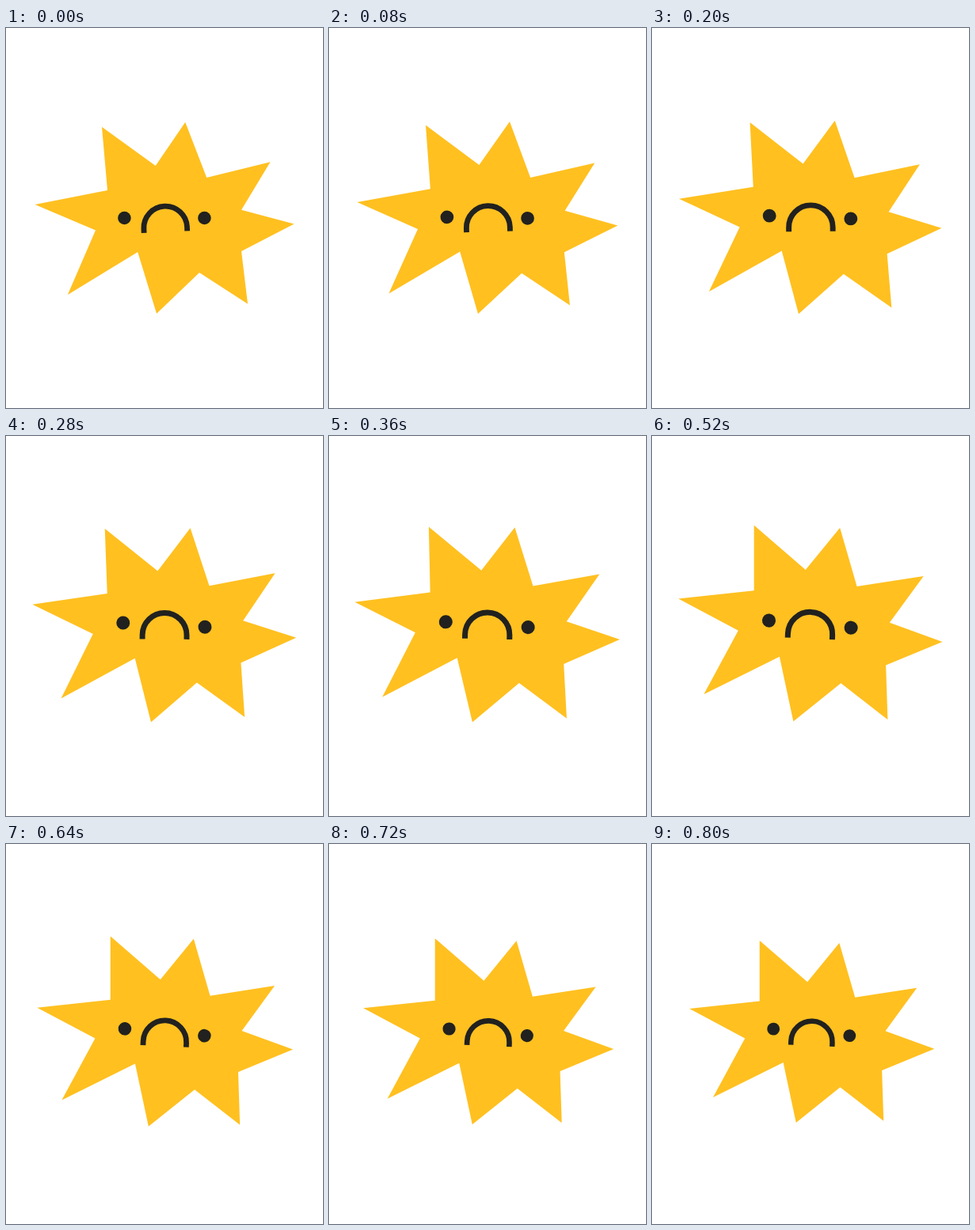
Write an HTML page with a canvas that moves like this. It is 400 px wide and 480 px high and loops after 960 ms.

```html
<!DOCTYPE html>
<html lang="en">
<head>
<meta charset="utf-8">
<title>Grumpy star</title>
<style>
  html, body { margin: 0; width: 100%; height: 100%; overflow: hidden; background: #fff; }
  canvas { display: block; width: 400px; height: 480px; }
</style>
</head>
<body>
<canvas id="stage" width="400" height="480"></canvas>
<script>
const ctx = document.getElementById("stage").getContext("2d");

const LOOP = 960, STEP = 40;
const YELLOW = "#ffc020", INK = "#21211f";
const PIVOT = { x: 226, y: 241 };
const STAR = [
  [121, 125], [188.7, 174], [226.2, 119], [253.2, 189],
  [333.5, 169.3], [297, 229.7], [363.5, 247.5], [297, 282],
  [305, 348.5], [244, 309], [190, 360.7], [166.2, 283],
  [77.8, 337], [113, 255.5], [36.5, 223], [128, 205]
];

const clamp01 = v => Math.min(1, Math.max(0, v));

function drawStar() {
  ctx.fillStyle = YELLOW;
  ctx.beginPath();
  for (const [x, y] of STAR) ctx.lineTo(x, y);
  ctx.closePath();
  ctx.fill();
}

function drawEye(x, y) {
  ctx.fillStyle = INK;
  ctx.beginPath();
  ctx.arc(x, y, 8.3, 0, Math.PI * 2);
  ctx.fill();
}

function drawMouth() {
  const radius = 27.3, leg = 5.2;
  ctx.save();
  ctx.translate(201.2, 252.4);
  ctx.rotate(-2.5 * Math.PI / 180);
  ctx.strokeStyle = INK;
  ctx.lineWidth = 6.8;
  ctx.beginPath();
  ctx.moveTo(-radius, leg);
  ctx.arc(0, 0, radius, Math.PI, Math.PI * 2);
  ctx.lineTo(radius, leg);
  ctx.stroke();
  ctx.restore();
}

// Turn and swell for 12 steps, shrink for 8, then hold until the loop restarts.
function draw(time) {
  const step = Math.floor((time % LOOP) / STEP);
  const swell = clamp01(step / 12);
  const shrink = clamp01((step - 12) / 8);
  const scale = 1 + 0.04 * swell - 0.085 * shrink;

  ctx.fillStyle = "#fff";
  ctx.fillRect(0, 0, 400, 480);
  ctx.save();
  ctx.translate(PIVOT.x, PIVOT.y);
  ctx.rotate(5 * swell * Math.PI / 180);
  ctx.scale(scale, scale);
  ctx.translate(-PIVOT.x, -PIVOT.y);
  drawStar();
  drawEye(149.4, 240);
  drawEye(250.4, 240);
  drawMouth();
  ctx.restore();
}

const start = performance.now();
function tick() {
  draw(performance.now() - start);
  requestAnimationFrame(tick);
}
tick();
</script>
</body>
</html>
```
